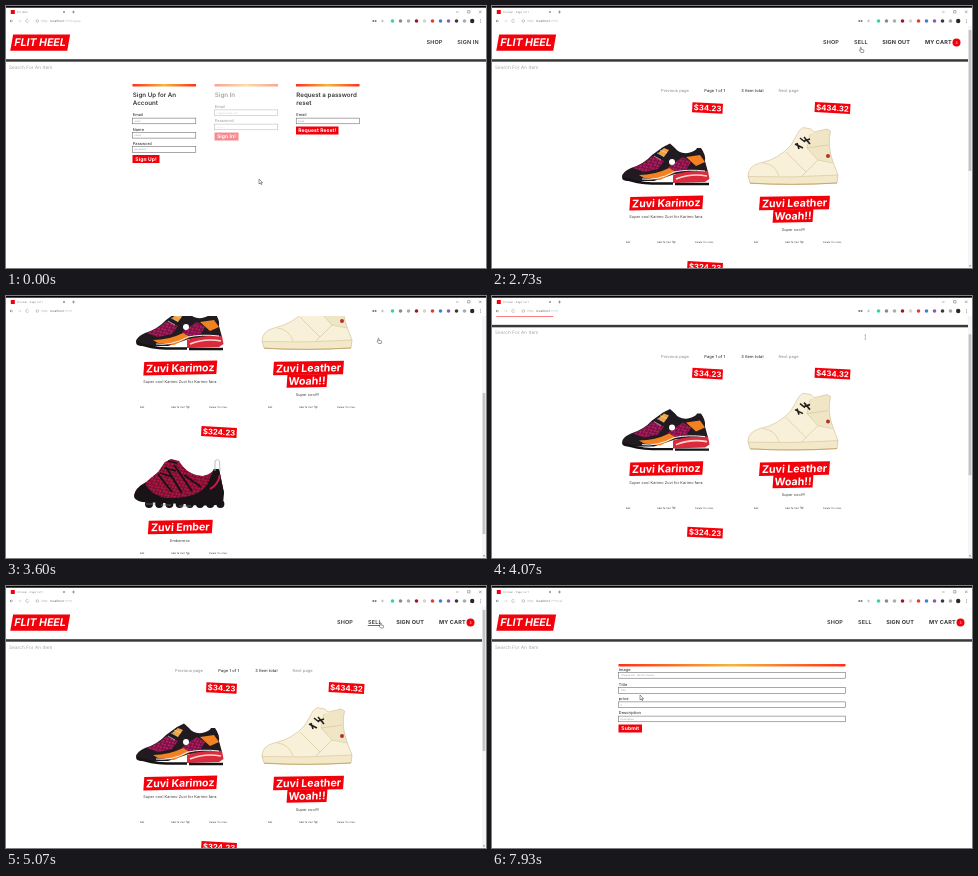
These frames come from a looping animation (480x262 px, 8 s). An HTML page:

```html
<!DOCTYPE html>
<html lang="en">
<head>
<meta charset="utf-8">
<title>Shop walkthrough</title>
<style>
  html, body { margin: 0; width: 100%; height: 100%; overflow: hidden; background: #fff; }
  svg { display: block; width: 100vw; height: 100vh; }
  text { font-family: Inter, "Open Sans", sans-serif; white-space: pre; text-rendering: geometricPrecision; }
</style>
</head>
<body>
<svg id="stage" viewBox="0 0 480 262"></svg>
<script>
const LOOP = 8000, RED = '#f3000b', INK = '#393939', BRAND = 'FLIT HEEL';

// ---------- drawing helpers ----------
const text = (x, y, s, size, { weight = 400, fill = INK, anchor = 'start', gap = size < 6 ? .02 : 0 } = {}) =>
  `<text x="${x}" y="${y + size * .36}" font-size="${size}" font-weight="${weight}" fill="${fill}" text-anchor="${anchor}" letter-spacing="${gap}em">${s}</text>`;
const rect = (x, y, w, h, fill, extra = '') =>
  `<rect x="${x}" y="${y}" width="${w}" height="${h}" fill="${fill}" ${extra}/>`;
const dot = (x, y, r, fill) => `<circle cx="${x}" cy="${y}" r="${r}" fill="${fill}"/>`;
const path = (d, fill, extra = '') => `<path d="${d}" fill="${fill}" ${extra}/>`;
const line = (d, stroke = '#555', w = .5) => path(d, 'none', `stroke="${stroke}" stroke-width="${w}"`);
const group = (id, body) => `<g id="${id}">${body}</g>`;
const label = (cx, cy, w, h, size, s, transform) =>
  `<g transform="translate(${cx} ${cy}) ${transform}">${rect(-w / 2, -h / 2, w, h, RED)}` +
  text(0, 0, s, size, { weight: 700, fill: '#fff', anchor: 'middle' }) + '</g>';
const heading = (cx, cy, w, s, h = 13.5) => label(cx, cy, w, h, 10.6, s, 'rotate(-1) skewX(-5)');
const price = (cx, cy, w, s) => label(cx, cy, w, 10, 7.8, s, 'rotate(3)');

// ---------- browser window ----------
function chrome() {
  const icons = [[386.5, '#2fd6a3'], [394.5, '#8a8a8a'], [402.5, '#9fb3ab'], [410.5, '#a01525'], [418.5, '#ddd0d0'],
    [426.5, '#e03a3a'], [434.5, '#3f7fd0'], [442.5, '#8d5bb5'], [450.5, '#3a3a3a'], [458.5, '#aaa']];
  return rect(0, 0, 480, 20, '#fff') + rect(0, 0, 480, 1.7, '#000') + rect(4.8, 4, 4, 4, RED) +
    group('tabShort', text(11, 6, 'Flit Heel', 2.6, { fill: '#888' })) +
    group('tabLong', text(11, 6, 'Flit Heel - Page 1 of 1', 2.5, { fill: '#888' })) +
    line('M57 5l2 2m0-2l-2 2M66 6h3m-1.5-1.5v3') +
    line('M450 6h2.6M461.6 4.6h2.4v2.4h-2.4zM473 4.6l2.5 2.5m0-2.5l-2.5 2.5', '#444', .4) +
    line('M7 15H4m1.3-1.3L4 15l1.3 1.3') + line('M12 15h3m-1.3-1.3L15 15l-1.3 1.3', '#ccc') +
    line('M22.6 14.2a1.5 1.5 0 1 0 .1 1.2M30 15a1.3 1.3 0 1 0 2.6 0a1.3 1.3 0 1 0-2.6 0', '#777', .4) +
    text(35.5, 15, 'http:', 3.1, { fill: '#aaa' }) + text(44, 15, 'localhost', 3.1, { fill: '#666' }) +
    ['signup', '', 'sell'].map((s, i) =>
      group('url' + i, text(58.2, 15, ':7777/' + s, 2.6, { fill: '#aaa' }))).join('') +
    line('M366.5 15h1.6m.7 0h1.6', '#555', 1.4) + line('M375 15h3m-1.5-1.4v2.8', '#999') +
    icons.map(([x, c]) => dot(x, 15, 1.8, c)).join('') + dot(466.2, 15, 2.2, '#25272c') +
    [13.6, 15, 16.4].map(y => dot(474.4, y, .4, '#444')).join('');
}

// ---------- header ----------
const nav = (x, s, weight = 700) => text(x, 36.5, s, 5.5, { weight, gap: .025 });
const header = () =>
  label(34.2, 36.6, 57, 16.4, 10.6, BRAND, 'skewX(-10)') +
  rect(0, 53.2, 480, 2.5, INK) + text(3, 61, 'Search For An Item', 4.6, { fill: '#888', weight: 300, gap: .03 }) +
  group('guest', nav(420.5, 'SHOP', 600) + nav(451.3, 'SIGN IN', 600)) +
  group('member', nav(331, 'SHOP', 600) + nav(362, 'SELL', 600) + nav(390.2, 'SIGN OUT') + nav(433, 'MY CART') +
    dot(464.5, 36.5, 4, RED) + text(464.5, 36.5, '3', 3.4, { fill: '#fff', anchor: 'middle' }) +
    `<rect id="underline" y="39" height=".8" fill="${RED}"/>`);

// ---------- forms ----------
const glow = (x, w) => rect(x, 78, w, 2.5, 'url(#glow)');
const field = (x, y, w, name, hint) =>
  text(x + .3, y, name, 3.9, { weight: 500 }) +
  rect(x + .2, y + 3.1, w - .4, 5.7, '#fff', 'stroke="#555" stroke-width=".5"') +
  text(x + 2, y + 6, hint, 2.4, { fill: '#999' });
const button = (x, y, w, s) => rect(x, y, w, 8, RED) +
  text(x + w / 2, y + 4, s, 5, { weight: 700, fill: '#fff', anchor: 'middle' });
const title = (x, ...rows) => rows.map((s, i) => text(x + .3, 89 + i * 8.2, s, 6.2, { weight: 600 })).join('');

const auth = () =>
  glow(126.5, 63.5) + title(126.5, 'Sign Up for An', 'Account') + field(126.5, 109, 63.5, 'Email', 'email') +
  field(126.5, 123.3, 63.5, 'Name', 'name') + field(126.5, 137.5, 63.5, 'Password', 'password') + button(126.5, 149, 27, 'Sign Up!') +
  group('signIn', glow(208.5, 63.5) + title(208.5, 'Sign In') + field(208.5, 100.8, 63.5, 'Email', 'me@example.com') +
    field(208.5, 115, 63.5, 'Password', '••••••') + button(208.5, 126.5, 24, 'Sign In!')) +
  glow(290, 63.5) + title(290, 'Request a password', 'reset') + field(290, 109, 63.5, 'Email', 'email') +
  button(290, 120.5, 42.5, 'Request Reset!');

const sell = () => glow(126.5, 227) +
  field(126.5, 83.4, 227, 'Image', ' Choose File   No file chosen') + field(126.5, 98.5, 227, 'Title', 'Title') +
  field(126.5, 112.8, 227, 'price', '0') + field(126.5, 127, 227, 'Description', 'Description') +
  button(126.5, 138.5, 23.5, 'Submit');

// ---------- shop ----------
const pager = (x, y) =>
  text(x, y, 'Previous page', 4, { fill: '#888' }) + text(x + 43.3, y, 'Page 1 of 1', 4, { weight: 500 }) +
  text(x + 80.2, y, '3 Item total', 4, { weight: 500 }) + text(x + 117.5, y, 'Next page', 4, { fill: '#888' });
const loading = () => pager(171.3, 84.6) + pager(171.3, 125) +
  text(230, 104.6, 'Loading...', 3.7, { weight: 500 });

const actions = (x, y) => text(x, y, 'Edit', 2.4) + text(x + 31, y, 'Add To Cart', 2.4) +
  line(`M${x + 46} ${y - 1}h.8l.5 1.6h1.5l.4-1.2h-1.9`, '#333', .4) + text(x + 69, y, 'Delete This Item', 2.3);
const blurb = (x, y, s) => text(x, y, s, 3.8, { anchor: 'middle' });

const runner = () => {
  const mesh = 'M141 162Q152 158 161 150L172 155L166 163L152 166ZM176 161L191 151L199 156L194 164L180 166Z';
  return path('M130 171Q130 166 139 162Q152 158 160 149L171 141L178 137.5L183 142Q187 148 196 147Q204 145 205 142L209 142Q214 149 213 155L216 166L183 168L162 175H136Q130 175 130 171Z', '#211a20') +
    path(mesh, '#b51a62') + path(mesh, 'url(#weave)') +
    path('M147 169Q163 169 177 162L184 166L168 174L152 172ZM194 151L208 149L213 156L204 160Z', '#f28221') +
    path('M166 147L172 142L177 144L172 151Z', '#f2a43a') +
    path('M181 169Q197 164 216 165L217.5 173L213 176L181 177Z', '#d92b3c') +
    line('M184 173Q199 167 215 170', '#ffd6d0', 1.6) + line('M150 173Q165 175 182 166Q196 163 213 165', '#f6f1f1', 1) +
    line('M131 172Q145 177 160 177.5H181M183 178H217', '#151214', 2.4) +
    line('M168 144l7 3m-10 0l7 3.5m-10-.5l7 4', '#eadfe4', .6) + dot(180, 156, 3, '#fff');
};

const highTop = () =>
  path('M256 170Q256 160 268 157Q287 153 299 139L307 125L311 121.5L319 123L322 126L335 123L338.5 125Q335 140 341 156L346 169L345 177Q300 180 258 177Z', '#f8f0d8') +
  path('M318 128L335 123L338.5 125Q335 140 341 156L326 154L315 142Z', '#f0e5c5') +
  path('M256 170.5Q300 172 346 169L345 177Q300 180 258 177Z', '#f3e8c8') +
  line('M256 170Q256 160 268 157Q287 153 299 139L307 125L311 121.5L319 123L322 126L335 123L338.5 125Q335 140 341 156L346 169L345 177Q300 180 258 177Z', '#cdbd92', .6) +
  line('M256 170.5Q300 172 346 169M271 157Q283 158 287 170M294 146L314 166M315 142L326 154L341 157M318 128L315 142L336 139M310 170L326 154', '#d2c398', .6) +
  line('M258 177.3Q300 179.5 345 177', '#c29c62', .8) +
  line('M308 132l5 4m-1-5l6 7m-15 0l8 4m-6-5l2 6m5-8l6-2', '#22201d', 1.6) + dot(336, 150, 2, '#b5302e');

const bubbleRunner = () => {
  const upper = 'M128 325Q129 317 140 311L152 301L159 291L165 288L173 290Q181 304 197 305Q206 303 208 298L213 298L218 322L213 330H134Z';
  const bubbles = Array.from({ length: 8 }, (_, i) => dot(143 + i * 10.2, 333, 4, '#171316')).join('');
  return path(upper, '#b51445') + path(upper, 'url(#weave)') +
    path('M128 325Q129 317 139 312Q143 323 160 327Q191 328 201 314L208 298L213 298L218 322L217 333Q200 336 178 333L136 331Q128 329 128 325Z', '#171316') + bubbles +
    line('M152 303L166 321M160 296L176 322M168 294L186 320M178 304L195 316', '#171316', 2) +
    line('M158 297l12 3m-16 2l12 4M162 290l9 2', '#171316', 1.4) + line('M204 318Q212 314 214 304', '#c31b4b', 2) +
    line('M209 300L209 290Q212 287 213.5 290L214 300', '#a9bcb9', .9) + line('M140 333h9m6 1h10m8 1h12', '#8f868a', .6);
};

const list = () =>
  pager(169, 84.6) + group('photos', runner() + highTop() + bubbleRunner()) +
  price(215.5, 102, 30.5, '$34.23') + heading(174.3, 197, 73, 'Zuvi Karimoz') +
  blurb(174, 210.8, 'Super cool Karimo Zuvi for Karimo fans') + actions(134, 236.3) +
  price(340.5, 102, 35.5, '$434.32') + heading(302.5, 197, 70, 'Zuvi Leather') + heading(301, 209.8, 40, 'Woah!!', 13) +
  blurb(301.5, 223.5, 'Super cool!!!') + actions(262, 236.3) +
  price(213, 261, 35.5, '$324.23') + heading(174.3, 356, 64, 'Zuvi Ember') +
  blurb(174, 369.5, 'Embermox') + actions(134, 382.5);

// ---------- assemble ----------
const $ = id => document.getElementById(id);
$('stage').innerHTML = `<defs>
  <linearGradient id="glow"><stop stop-color="#ff3019"/><stop offset=".5" stop-color="#f2b63c"/><stop offset="1" stop-color="#ff3019"/></linearGradient>
  <pattern id="weave" width="5" height="4" patternUnits="userSpaceOnUse" patternTransform="rotate(-28)">
    <path d="M0 1h3M2 3h3" stroke="#241018" stroke-width=".9"/></pattern></defs>` +
  rect(0, 0, 480, 262, '#fff') +
  group('page', header() + group('auth', auth()) + group('loading', loading()) + group('list', list()) + group('sell', sell())) +
  group('scrollbar', rect(476, 20, 4, 242, '#f5f5f5') + `<rect id="thumb" x="476.6" width="2.8" height="141" fill="#c4c4c4"/>` +
    path('M477 259.5h2l-1 1.3z', '#555')) +
  chrome() + `<rect id="progress" y="20" height="1.1" fill="${RED}"/>` +
  group('cursor',
    group('arrow', path('M0 0V5L1.2 3.9L2.1 5.6L2.9 5.2L2.1 3.6H3.6Z', '#fff', 'stroke="#222" stroke-width=".45"')) +
    group('hand', path('M0 .6Q.5-.3 1 .6V2.4L3.2 2.9Q3.8 3 3.6 4L3.1 5.5H.6L-1 3.3Q-.6 2.7 0 3.3Z', '#fff', 'stroke="#222" stroke-width=".45"')) +
    group('beam', line('M-.7-2.2H.7M0-2.2V2.4M-.7 2.4H.7', '#666', .4)));

// ---------- timing ----------
const clamp = v => Math.max(0, Math.min(1, v));
const between = (t, a, b) => t >= a && t < b;
const smooth = v => v * v * (3 - 2 * v);

// Rows are [time, ...values]; eased from one row to the next.
function track(rows, t) {
  const i = rows.findIndex(r => r[0] > t);
  if (i < 0) return rows.at(-1).slice(1);
  const a = rows[i - 1], b = rows[i], k = smooth((t - a[0]) / (b[0] - a[0]));
  return a.slice(1).map((v, n) => v + (b[n + 1] - v) * k);
}

const cursorPath = [[0, 253, 173], [70, 253, 173], [870, 251.3, 173], [2130, 251.3, 173], [2730, 368.3, 41], [3200, 368.3, 41],
  [3600, 372, 42], [3870, 372, 42], [4070, 373.3, 41], [4200, 373.3, 41], [4560, 374, 36.5], [5800, 374, 36.5],
  [6270, 217, 91], [6730, 217, 91], [7200, 142, 46], [7530, 142, 46], [7930, 148, 109], [8000, 148, 109]];
const scrollPath = [[0, 0], [3200, 0], [3600, 125], [3800, 125], [4178, 0], [8000, 0]];

// cubic-bezier(1, -.65, 0, 2.31)
function snap(x) {
  if (x <= 0 || x >= 1) return clamp(x);
  const curve = (s, p, q) => 3 * (1 - s) ** 2 * s * p + 3 * (1 - s) * s * s * q + s ** 3;
  let lo = 0, hi = 1;
  for (let i = 0; i < 24; i++) {
    const mid = (lo + hi) / 2;
    if (curve(mid, 1, 0) < x) lo = mid; else hi = mid;
  }
  return curve(lo, -.65, 2.31);
}
const hover = (t, enter, leave) => t < leave ? snap((t - enter) / 400) : 1 - snap((t - leave) / 400);

const show = (id, on) => $(id).setAttribute('display', on ? 'inline' : 'none');
const set = (id, attrs) => Object.entries(attrs).forEach(([k, v]) => $(id).setAttribute(k, v));

function draw(t) {
  const onAuth = t < 600, onLoading = between(t, 600, 1870), onList = between(t, 1870, 5400), onSell = t >= 5400;
  show('auth', onAuth); show('loading', onLoading); show('list', onList); show('sell', onSell);
  show('photos', t >= 1930);
  show('guest', t < 1870); show('member', t >= 1870); show('scrollbar', onList);
  show('tabShort', onAuth); show('tabLong', !onAuth);
  [onAuth, onLoading || onList, onSell].forEach((on, i) => show('url' + i, on));
  set('signIn', { opacity: t < 130 ? .45 : 1 });
  set('member', { transform: `translate(${onSell ? 4 : 0} 0)` });

  const [scroll] = track(scrollPath, t);
  set('page', { transform: `translate(0 ${-scroll})` });
  set('thumb', { y: 24 + scroll * .584 });

  const width = 14.5 * Math.max(0, t < 4000 ? hover(t, 2670, 3330) : hover(t, 4520, 5830));
  set('underline', { x: 369 - width / 2, width });

  const [start, end] = t < 3000 ? [130, 870] : [5130, 5540];
  set('progress', { width: 480 * smooth(clamp((t - start) / (end - start))), opacity: 1 - clamp((t - end) / 130) });

  const [x, y] = track(cursorPath, t);
  const hand = between(t, 2640, 3990) || between(t, 4440, 5880), beam = between(t, 3990, 4440);
  set('cursor', { transform: `translate(${x} ${y})` });
  show('hand', hand); show('beam', beam); show('arrow', !hand && !beam);
}

const origin = performance.now();
function frame() {
  draw((performance.now() - origin) % LOOP);
  requestAnimationFrame(frame);
}
frame();
</script>
</body>
</html>
```
